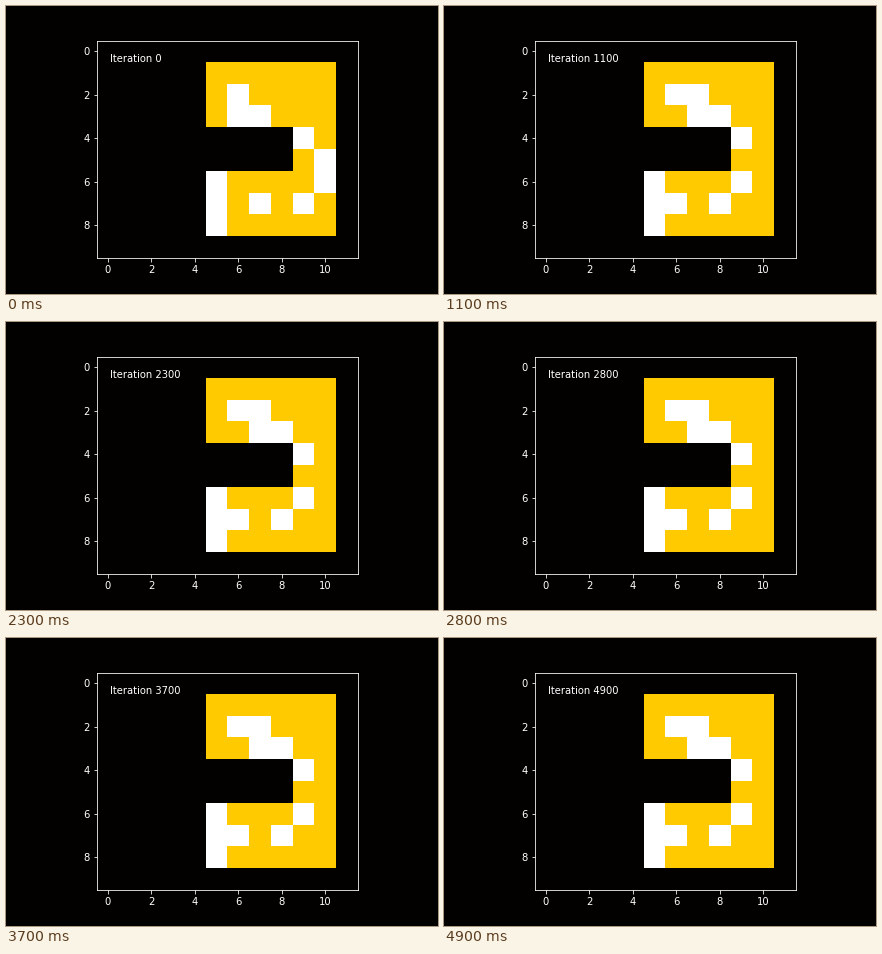
A matplotlib script for the animation above (5 s loop, 432 by 288 pixels).

```python
import numpy as np
import matplotlib.pyplot as plt
from matplotlib.animation import FuncAnimation
from matplotlib.colors import ListedColormap

FRAMES, INTERVAL = 50, 100
EXPLORE_EVERY, FINISH_EVERY = 12, 16
WALL, FINISH, ROAD, VISITED = range(4)
BLACK = "#020100"
PALETTE = ListedColormap([BLACK, "#ea0000", "#ffca00", "white"])

plt.rcParams.update({
    "figure.facecolor": BLACK, "axes.facecolor": BLACK,
    "axes.edgecolor": "white", "text.color": "white",
    "xtick.color": "white", "ytick.color": "white",
    "font.family": "DejaVu Sans", "font.size": 10,
    "text.kerning_factor": 6,
})


def drive(n):
    """Cells (column, row) where the car stops in its run."""
    if n % EXPLORE_EVERY:
        return [(6, 7), (8, 7), (9, 6), (9, 4), (8, 3), (7, 3), (7, 2), (6, 2)]
    lane = 7 if n < FRAMES / 2 else 8
    return [(7, lane), (9, lane), (10, 6), (10, 5),
            (9, 4), (7, 3), (6, 3), (6, 2)]


def track_grid(n):
    grid = np.full((10, 12), WALL)
    grid[1:9, 5:11] = ROAD
    grid[4:6, 5:9] = WALL
    grid[6:9, 5] = VISITED
    for col, row in drive(n):
        grid[row, col] = VISITED
    if n and n % FINISH_EVERY == 0:
        grid[1:3, 5] = FINISH
    return grid


fig, ax = plt.subplots(figsize=(6, 4), dpi=72)
fig.subplots_adjust(left=0.125, right=0.9, bottom=0.125, top=0.88)
image = ax.imshow(track_grid(0), cmap=PALETTE, vmin=WALL, vmax=VISITED,
                  interpolation="nearest")
ax.set_xticks(range(0, 11, 2))
ax.set_yticks(range(0, 9, 2))
label = ax.text(0.05, 0.9, "", transform=ax.transAxes)


def update(n):
    image.set_data(track_grid(n))
    label.set_text(f"Iteration {100 * n}")
    return image, label


anim = FuncAnimation(fig, update, frames=FRAMES, interval=INTERVAL,
                     repeat=True, repeat_delay=0)
plt.show()
```
